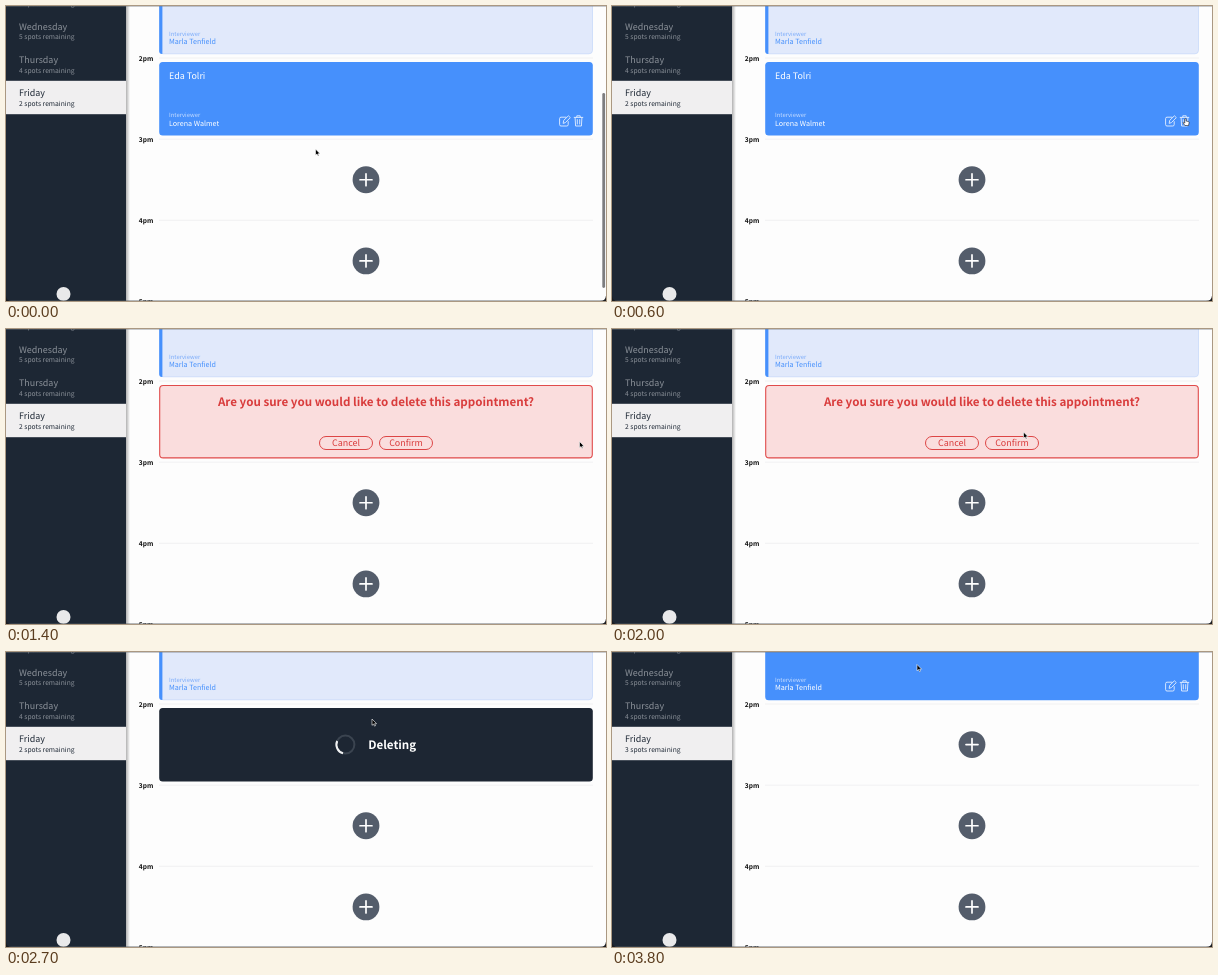
Animation, 600 px wide and 295 px high, one loop 3900 ms. Source, as an HTML page:

```html
<!DOCTYPE html>
<html lang="en">
<head>
<meta charset="utf-8">
<title>Interview schedule</title>
<style>
  html, body { margin: 0; width: 100%; height: 100%; overflow: hidden; background: #fdfdfd; }
  svg { display: block; width: 600px; height: 295px; }
  text {
    font-family: "Noto Sans CJK JP", "Noto Sans CJK SC", "Noto Sans CJK", "Open Sans", sans-serif;
    font-size: 8.95px;
    text-rendering: geometricPrecision;
    white-space: pre;
  }
  .spots { font-size: 6.72px; }
  .hour { font-size: 6.6px; font-weight: 700; fill: #111; }
  .label { font-size: 5.85px; }
  .person { font-size: 7.15px; }
  .big { font-size: 11.6px; font-weight: 700; }
  .mid { text-anchor: middle; }
  .icon { fill: none; stroke: #fff; stroke-width: .9; stroke-linejoin: round; stroke-linecap: round; opacity: .85; }
</style>
</head>
<body>
<svg viewBox="0 0 600 295">
  <defs>
    <linearGradient id="shade">
      <stop offset="0" stop-color="#000" stop-opacity=".3"/>
      <stop offset="1" stop-color="#000" stop-opacity="0"/>
    </linearGradient>
    <g id="plus">
      <circle r="13.4" fill="#545d6b"/>
      <path d="M-6 0H6M0-6V6" stroke="#fff" stroke-width="1.7" stroke-linecap="round"/>
    </g>
    <g id="tools" class="icon">
      <path d="M560 -3.8H555Q553.6 -3.8 553.6 -2.4V3.6Q553.6 5 555 5H560.8Q562.2 5 562.2 3.6V.6"/>
      <path d="M557.2 2L557.7 -.6L562.4 -5.2L564.3 -3.4L559.7 1.3Z"/>
      <path d="M568.2 -3.6H576.8M570.8 -3.8V-5.2H574.2V-3.8M569.1 -3.4L569.6 5H575.4L575.9 -3.4M571.3 -1.4V3M573.7 -1.4V3"/>
    </g>
  </defs>

  <rect width="600" height="295" fill="#fdfdfd"/>
  <g id="hours"></g>

  <g id="topIdle">
    <rect x="153.5" y="-20" width="433" height="67.8" rx="3.5" fill="#e1e9fb" stroke="#c3d6f9" stroke-width=".7"/>
    <path d="M153.2 -2H156.4V48H156Q153.2 48 153.2 45Z" fill="#4690fc"/>
    <text class="label" x="163" y="29.8" fill="#7aabfa">Interviewer</text>
    <text class="person" x="163" y="38.4" fill="#4690fc">Marla Tenfield</text>
  </g>
  <g id="topHover">
    <rect x="153.2" y="-20" width="433.6" height="68.2" rx="3.5" fill="#4690fc"/>
    <text class="label" x="163" y="29.8" fill="#c9deff">Interviewer</text>
    <text class="person" x="163" y="38.4" fill="#fff">Marla Tenfield</text>
    <use href="#tools" y="34"/>
  </g>

  <g id="booked">
    <rect x="153.2" y="56" width="433.6" height="73.4" rx="3.5" fill="#4690fc"/>
    <text x="163" y="73.3" fill="#fff">Eda Tolri</text>
    <text class="label" x="163" y="110.9" fill="#c9deff">Interviewer</text>
    <text class="person" x="163" y="119.5" fill="#fff">Lorena Walmet</text>
    <use href="#tools" y="115"/>
  </g>

  <g id="confirm" fill="#d93c3c">
    <rect x="153.7" y="56.5" width="432.6" height="72.4" rx="3.5" fill="#fadddd" stroke="#e04b4b" stroke-width="1.1"/>
    <text class="big mid" x="370" y="77">Are you sure you would like to delete this appointment?</text>
    <g fill="none" stroke="#dd4646" stroke-width="1">
      <rect x="313.5" y="107.5" width="53" height="13" rx="6.5"/>
      <rect x="373.5" y="107.5" width="53" height="13" rx="6.5"/>
    </g>
    <text class="mid" x="340" y="117.4">Cancel</text>
    <text class="mid" x="400" y="117.4">Confirm</text>
  </g>

  <g id="deleting">
    <rect x="153.2" y="56" width="433.6" height="73.4" rx="3.5" fill="#1d2633"/>
    <g fill="none" stroke-width="2">
      <circle cx="339.4" cy="92.6" r="9" stroke="#3b4450"/>
      <path d="M331.2 89A9 9 0 0 0 337 101.3" stroke="#f1f2f3"/>
    </g>
    <text class="big" x="362.2" y="97.4" fill="#fff">Deleting</text>
  </g>

  <rect x="120" width="4" height="295" fill="url(#shade)"/>
  <rect width="120" height="295" fill="#1d2734"/>
  <rect y="74.8" width="120" height="33.4" fill="#f0eff0"/>
  <g id="days"></g>
  <circle cx="57.5" cy="288" r="7" fill="#e9e9ea"/>

  <rect id="thumb" x="596.3" y="87" width="2.8" height="195" rx="1.4" fill="#7d7d7f"/>
  <path d="M0 .4H600" stroke="#777d85" stroke-width=".8" opacity=".55"/>
  <path d="M0 294.6H600" stroke="#555b63" stroke-width=".8" opacity=".6"/>
  <path d="M600 289.5V295H594Q599.5 295 600 289.5M0 289.5V295H6Q.5 295 0 289.5" fill="#1a1c20"/>

  <g id="cursor" stroke-linejoin="round">
    <path id="arrow" d="M0 0V6.3L1.5 5L2.5 7.1L3.5 6.7L2.6 4.7H4.6Z" fill="#000" stroke="#fff" stroke-width=".6"/>
    <path id="hand" d="M-.7 .3Q0 -.5 .6 .3V2.5L3.2 3.2Q3.8 3.5 3.6 4.4L3 7H-.6L-2.5 4.3Q-2.3 3.4 -1.5 4L-.7 4.6Z" fill="#fff" stroke="#222" stroke-width=".6"/>
  </g>
</svg>

<script>
const LOOP = 3900, STEP = 100, PITCH = 81.15;
const byId = id => document.getElementById(id);

// Pointer path: time, x, y
const path = [
  [0, 309.5, 143], [200, 482, 113], [300, 541, 113], [400, 568, 112.5], [500, 573.5, 112.5],
  [1500, 573.5, 112.5], [1700, 520, 107], [1900, 424, 102.5], [2000, 411.5, 103],
  [2200, 407, 110], [2500, 407, 110], [2700, 366, 67], [2900, 312, 18],
  [3000, 305, 12.5], [3900, 305, 12.5]
];

function pointer(t) {
  const i = path.findIndex(p => p[0] > t);
  const [t0, x0, y0] = path[i - 1], [t1, x1, y1] = path[i];
  const k = (t - t0) / (t1 - t0);
  return [x0 + (x1 - x0) * k, y0 + (y1 - y0) * k];
}

const show = (id, on) => byId(id).setAttribute("display", on ? "inline" : "none");

byId("hours").innerHTML = [2, 3, 4, 5].map((h, i) => {
  const y = 52 + i * PITCH;
  return `<path d="M153 ${y}H587" stroke="#eeeeef" stroke-width=".8"/>
    <text class="hour" x="132.8" y="${y + 2.6}">${h}pm</text>
    <use href="#plus" x="360" y="${y + 40.6}"/>`;
}).join("");

byId("days").innerHTML = [["Tuesday", 3], ["Wednesday", 5], ["Thursday", 4], ["Friday", 2]].map(([day, n], i) => {
  const y = 23.6 + (i - 1) * 33.4, on = day === "Friday";
  return `<g fill="${on ? "#1f2936" : "#8b9199"}">
    <text x="13" y="${y}">${day}</text>
    <text class="spots" x="13" y="${y + 9.6}"${on ? ' id="left"' : ""}>${n} spots remaining</text></g>`;
}).join("");

function draw(t) {
  const [x, y] = pointer(t);
  const booked = t < 1300, asking = !booked && t < 2400, busy = t >= 2400 && t < 3500;
  const hover = t >= 2500 && y < 48;
  const link = booked && x > 566 || asking && (x > 566 && t < 1300 || y > 107.5 && x < 427);

  show("booked", booked);
  show("confirm", asking);
  show("deleting", busy);
  show("topHover", hover);
  show("topIdle", !hover);
  show("hand", link);
  show("arrow", !link);
  byId("cursor").setAttribute("transform", `translate(${x} ${y})`);
  byId("thumb").setAttribute("opacity", Math.max(0, Math.min(1, (500 - t) / 300)));
  byId("left").textContent = `${t < 3500 ? 2 : 3} spots remaining`;
}

const start = performance.now();
function tick() {
  const t = (performance.now() - start) % LOOP;
  draw(Math.floor(t / STEP) * STEP);
  requestAnimationFrame(tick);
}
tick();
</script>
</body>
</html>
```
